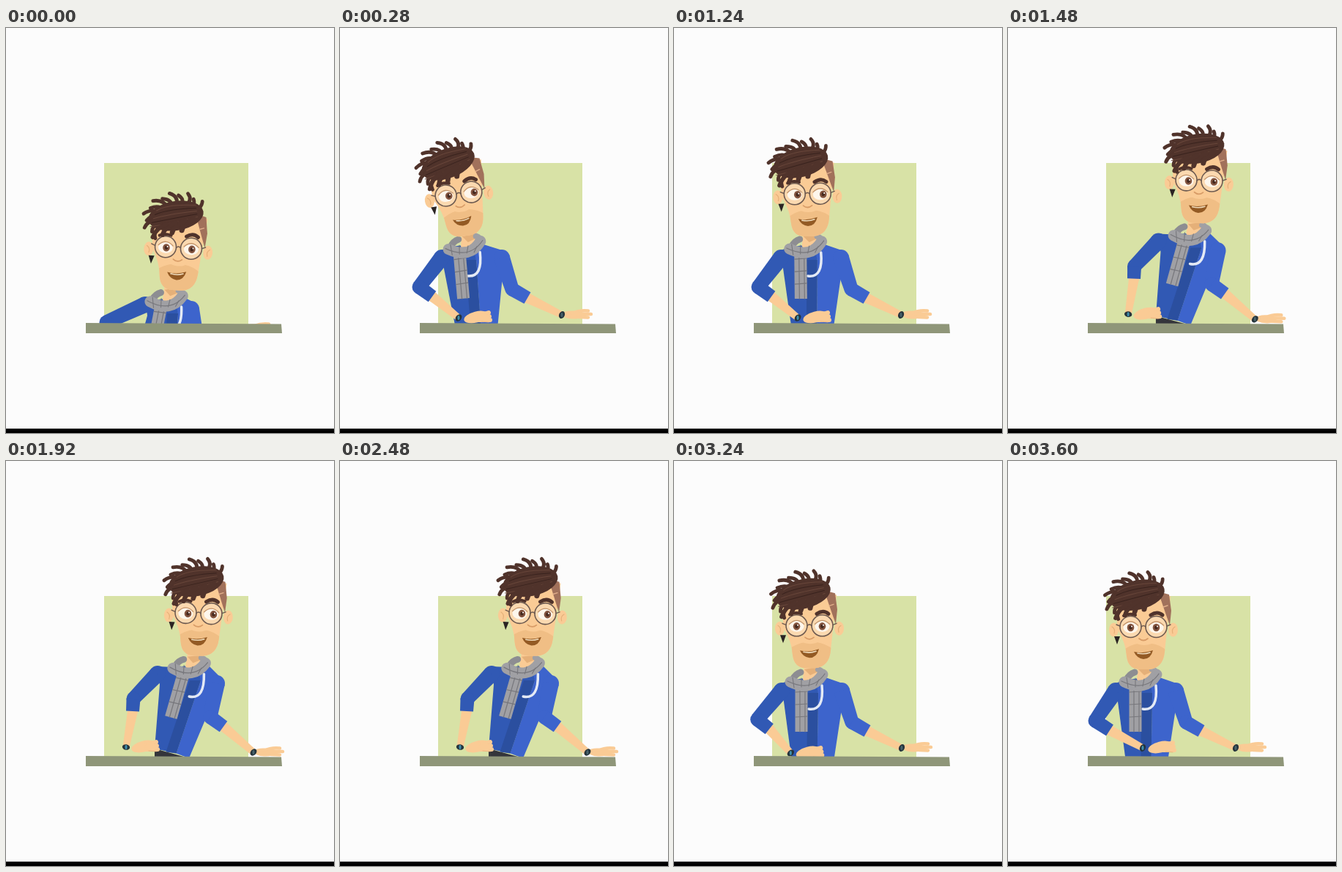
Recreate the animation shown at these times as an HTML page with a canvas. Size 448 by 552 pixels, loop 6040 ms.

```html
<!DOCTYPE html>
<html lang="en">
<head>
<meta charset="utf-8">
<title>Man at the counter</title>
<style>
html, body { margin: 0; width: 100%; height: 100%; overflow: hidden; background: #fcfcfc; }
canvas { display: block; }
</style>
</head>
<body>
<canvas id="stage" width="448" height="552"></canvas>
<script>
const g = document.getElementById('stage').getContext('2d');
const LOOP = 6040, STEP = 40;
const SKIN = '#facb95', SKIN_SHADE = '#e5b079', BEARD = '#f0be85';
const HAIR = '#50332b', FRAME = '#6d5a50', BLUE = '#3d64cc', DARK_BLUE = '#3159b4';

// Skeleton joints. head and scarf: x, y, degrees. arms: shoulder, elbow, cuff, wrist.
const upright = {
  head: [185, 226, 0], look: [0], hair: [0], scarf: [182, 298, 0], hips: [161, 410, 218, 410],
  armL: [147, 313, 116, 353, 134, 366, 170, 395],
  armR: [229, 313, 243, 356, 264, 368, 311, 391]
};
const tall = {
  head: [263, 207.5, 2], look: [3], hair: [4], scarf: [251, 281, 16], hips: [203, 392, 250, 405],
  armL: [207, 290, 174, 324, 173, 341, 164, 390],
  armR: [288, 303, 279, 349, 297, 362, 338, 397]
};
const ducked = {
  head: [235.5, 299.5, 4], look: [1], hair: [2], scarf: [220, 371, 11], hips: [184, 425, 268, 425],
  armL: [190, 377, 137, 401, 160, 420, 165, 435],
  armR: [253, 383, 259, 412, 270, 425, 323, 409]
};
const presenting = { ...upright, armL: [147, 313, 119, 354, 139, 367, 184, 391] };

const mix = (a, b, k) => Object.fromEntries(Object.keys(a).map(
  key => [key, a[key].map((v, i) => v + (b[key][i] - v) * k)]));

// Swaying to the left: the higher the part, the further it goes.
function lean(amount, look) {
  const shift = (list, dx) => list.map((v, i) => i % 2 ? v : v - dx * amount);
  return {
    ...upright, look: [look],
    head: [185 - 23 * amount, 226, -8 * amount],
    scarf: [182 - 11 * amount, 298, -5 * amount],
    hips: shift(upright.hips, 3),
    armL: shift(upright.armL, 8),
    armR: shift(upright.armR, 8)
  };
}

const windUp = { ...mix(upright, presenting, -.9), head: [185, 224, 0] };
const keys = [
  [0, ducked], [200, lean(1.25, 4)], [280, lean(1, 4)], [640, lean(.48, 4)],
  [760, lean(.42, 4)], [1320, lean(.1, 4)], [1480, mix(tall, upright, .025)],
  [1680, tall], [2480, tall], [2680, lean(.45, 1)], [2880, upright],
  [3120, upright], [3280, windUp], [3600, presenting], [LOOP, presenting]
];

function poseAt(t) {
  const i = keys.findIndex(k => k[0] > t);
  const [t0, a] = keys[i - 1], [t1, b] = keys[i];
  const k = (t - t0) / (t1 - t0);
  return mix(a, b, k * k * (3 - 2 * k));
}

function fill(color) { g.fillStyle = color; g.fill(); }
function stroke(color, width) { g.strokeStyle = color; g.lineWidth = width; g.stroke(); }
function polygon(color, ...p) {
  g.beginPath();
  for (let i = 0; i < p.length; i += 2) g.lineTo(p[i], p[i + 1]);
  fill(color);
}
function oval(x, y, rx, ry, color, tilt = 0) {
  g.beginPath();
  g.ellipse(x, y, rx, ry, tilt, 0, 7);
  fill(color);
}
function curve(x0, y0, cx, cy, x1, y1, color, width) {
  g.beginPath();
  g.moveTo(x0, y0);
  g.quadraticCurveTo(cx, cy, x1, y1);
  stroke(color, width);
}
function line(x0, y0, x1, y1, color, width) { curve(x0, y0, x0, y0, x1, y1, color, width); }
function placed(x, y, degrees, draw) {
  g.save();
  g.translate(x, y);
  g.rotate(degrees * Math.PI / 180);
  draw();
  g.restore();
}
// Tapered limb with a round start and a flat end.
function tube(x0, y0, r0, x1, y1, r1, color) {
  const a = Math.atan2(y1 - y0, x1 - x0), nx = -Math.sin(a), ny = Math.cos(a);
  oval(x0, y0, r0, r0, color);
  polygon(color, x0 + nx * r0, y0 + ny * r0, x0 - nx * r0, y0 - ny * r0,
    x1 - nx * r1, y1 - ny * r1, x1 + nx * r1, y1 + ny * r1);
}

function drawArm([sx, sy, ex, ey, cx, cy, wx, wy], color, band, drawHand) {
  placed(wx, wy, 0, drawHand);
  tube(cx, cy, 7, wx, wy, 4.5, SKIN);
  oval(wx, wy, 3.8, 5.2, '#25343c', Math.atan2(wy - cy, wx - cx));
  oval(wx, wy, 1.5, 3, band);
  tube(sx, sy, 11, ex, ey, 9.5, color);
  tube(ex, ey, 9.5, cx, cy, 9, color);
}
function drawLeftHand() {
  oval(24, -1, 17, 7.5, SKIN, -.25);
  for (let i = 0; i < 3; i++) {
    line(28, -3 + i * 3, 41 + i, -7 + i * 5, SKIN, 6);
    line(31, -1 + i * 3, 39 + i, -4 + i * 5, SKIN_SHADE, .8);
  }
}
function drawRightHand() {
  oval(15, 0, 14, 5.5, SKIN, .05);
  for (let i = -1; i < 2; i++)
    curve(14, i * 2, 25, i * 5 - 2, 40 - i * i * 4, i * 4.5 - 1, SKIN, 4.5);
}

function drawTorso({ armL, armR, scarf, hips }) {
  const [lx, ly] = armL, [rx, ry] = armR, [nx, ny] = scarf;
  const [hx, hy, kx, ky] = hips, mx = (hx + kx) / 2 + 6, my = (hy + ky) / 2;
  polygon('#34353b', hx, hy, kx, ky, kx, 425, hx, 425);
  polygon(BLUE, nx, ny - 3, nx + 25, ny - 3, rx + 4, ry - 9, rx + 3, ry + 5, kx, ky, mx, my, nx + 15, ny + 18);
  polygon(DARK_BLUE, nx + 10, ny - 3, nx - 22, ny, lx, ly - 10, lx + 3, ly + 15, hx, hy, mx, my, nx + 15, ny + 18);
  polygon('#2b4f9f', nx + 15, ny + 18, mx, my, mx - 14, my - 2, nx, ny + 18);
}

function drawScarf([x, y, tail]) {
  const dark = '#77777c';
  placed(x, y, tail / 4, () => {
    polygon(SKIN, -4, -24, 16, -24, 18, 0, 6, 10, -6, 0);
    polygon(SKIN_SHADE, -4, -14, 16, -18, 15, -11, 4, -6);
    g.beginPath();
    g.moveTo(20, 8);
    g.bezierCurveTo(22, 30, 17, 42, 2, 40);
    stroke('#e4eaf5', 3.5);
  });
  placed(x - 8, y + 7, tail, () => {
    g.fillStyle = '#a0a0a4';
    g.fillRect(-8.5, -6, 17, 70);
    for (const tx of [-2, 5]) line(tx, 0, tx, 64, dark, 1.2);
    for (let ty = 10; ty < 60; ty += 17) line(-8, ty, 8, ty - 1, dark, 1.2);
  });
  placed(x, y, tail / 4, () => {
    curve(-20, 0, -16, -8, -9, -10, '#8d8d92', 9);
    curve(-23, 3, 6, 17, 21, -7, '#a0a0a4', 15);
    curve(21, -7, 21, -12, 15, -14, '#a0a0a4', 8);
    curve(-27, 2, 6, 18, 24, -8, dark, 1.2);
    for (let i = 0; i < 4; i++) line(-20 + i * 12, -3 + i, -18 + i * 10, 11 - i, dark, 1.1);
  });
}

function drawEye(x, look) {
  oval(x, 0, 14.5, 14.5, '#fbd9b0');
  oval(x, 1, 10, 7.5, '#fdf6ec');
  oval(x + look, 1, 4.8, 5.2, '#83543f');
  oval(x + look, 1, 2.3, 2.6, '#45291f');
  oval(x + look + 1.5, -.5, 1, 1, '#fff');
  curve(x - 10, -2, x, -12, x + 10, -2, '#c4956b', 1.3);
  g.beginPath();
  g.arc(x, 0, 14.5, 0, 7);
  stroke(FRAME, 1.6);
}

// Locks fan out around a tilted crown, with a fringe falling over the forehead.
function drawHair() {
  placed(-9, -41, -13, () => {
    oval(1, -2, 38, 20, HAIR);
    const locks = 13;
    for (let i = 0; i < locks; i++) {
      const a = 2.35 + 3.45 * i / (locks - 1), reach = i % 2 ? .9 : 1.02;
      const at = (angle, r) => [44 * r * Math.cos(angle), 33 * r * Math.sin(angle)];
      curve(...at(a + .25, .5), ...at(a + .3, reach * .85), ...at(a, reach), HAIR, 4.8);
    }
    for (let i = 0; i < 5; i++)
      curve(-36 + i * 3, 7 - i * 5, -8, 8 - i * 7, 30, 4 - i * 4, i % 2 ? '#38221d' : '#68463a', 1);
  });
  for (let i = 0; i < 4; i++)
    curve(16 - i * 12, -40 + i * 3, 2 - i * 12, -34 + i * 3, 1 - i * 13, -24 + i * 4, HAIR, 7 - i * .4);
}

function drawFace() {
  g.beginPath();
  g.moveTo(-37, -42);
  g.lineTo(-36, 2);
  g.quadraticCurveTo(-24, 22, -23, 40);
  g.quadraticCurveTo(-21, 58, -4, 58);
  g.lineTo(8, 58);
  g.quadraticCurveTo(27, 56, 29, 34);
  g.lineTo(37, -42);
  fill(SKIN);
  g.save();
  g.clip();
  oval(2, 46, 36, 24, BEARD);
  oval(1, 20, 12, 5, SKIN);
  g.restore();
}

function drawHead({ head, look, hair }) {
  placed(...head, () => {
    for (const side of [-1, 1]) {
      oval(side * 40.5, 4, 6.5, 9.5, SKIN);
      curve(side * 43, 0, side * 38, 3, side * 40, 9, SKIN_SHADE, 1.2);
    }
    drawFace();
    polygon('#a1715b', 20, -48, 35, -44, 38, -22, 36, -2, 31, -16);
    line(27, -27, 33, -29, '#e1af8b', 1.4);
    curve(-27, -15, -20, -19, -11, -16, HAIR, 4);
    curve(10, -16, 19, -22, 26, -16, HAIR, 5);
    for (const side of [-1, 1]) {
      drawEye(side * 17.5, look[0]);
      line(side * 32, -1, side * 37, -3, FRAME, 1.4);
    }
    curve(-3, 0, 0, -3, 3, 0, FRAME, 1.6);
    curve(-6, 16, 0, 21, 6, 16, '#d89c67', 1.7);
    g.beginPath();
    g.moveTo(-13, 34);
    g.quadraticCurveTo(0, 37, 13, 32);
    g.quadraticCurveTo(10, 44, 0, 44);
    g.quadraticCurveTo(-9, 43, -13, 34);
    fill('#935a24');
    curve(-8, 36, 1, 38, 9, 35, '#f0dcbc', 1.6);
    polygon('#2a2423', -40, 13, -32, 13, -36, 24);
    placed(hair[0], 0, 0, drawHair);
  });
}

function drawScene(t) {
  g.fillStyle = '#fcfcfc';
  g.fillRect(0, 0, 448, 552);
  g.fillStyle = '#d8e2a6';
  g.fillRect(134, 184, 197, 220);

  const pose = poseAt(t);
  g.save();
  g.beginPath();
  g.rect(0, 0, 448, 404);
  g.clip();
  g.lineCap = g.lineJoin = 'round';
  drawTorso(pose);
  drawArm(pose.armR, BLUE, '#47636c', drawRightHand);
  drawArm(pose.armL, DARK_BLUE, '#3f8fae', drawLeftHand);
  drawScarf(pose.scarf);
  drawHead(pose);
  g.restore();

  polygon('#8f9679', 109, 402, 376, 403.5, 377, 416, 109, 416);
  g.fillStyle = '#000';
  g.fillRect(0, 546, 448, 6);
}

function tick(now) {
  drawScene(Math.floor(now % LOOP / STEP) * STEP);
  requestAnimationFrame(tick);
}
tick(performance.now());
</script>
</body>
</html>
```
